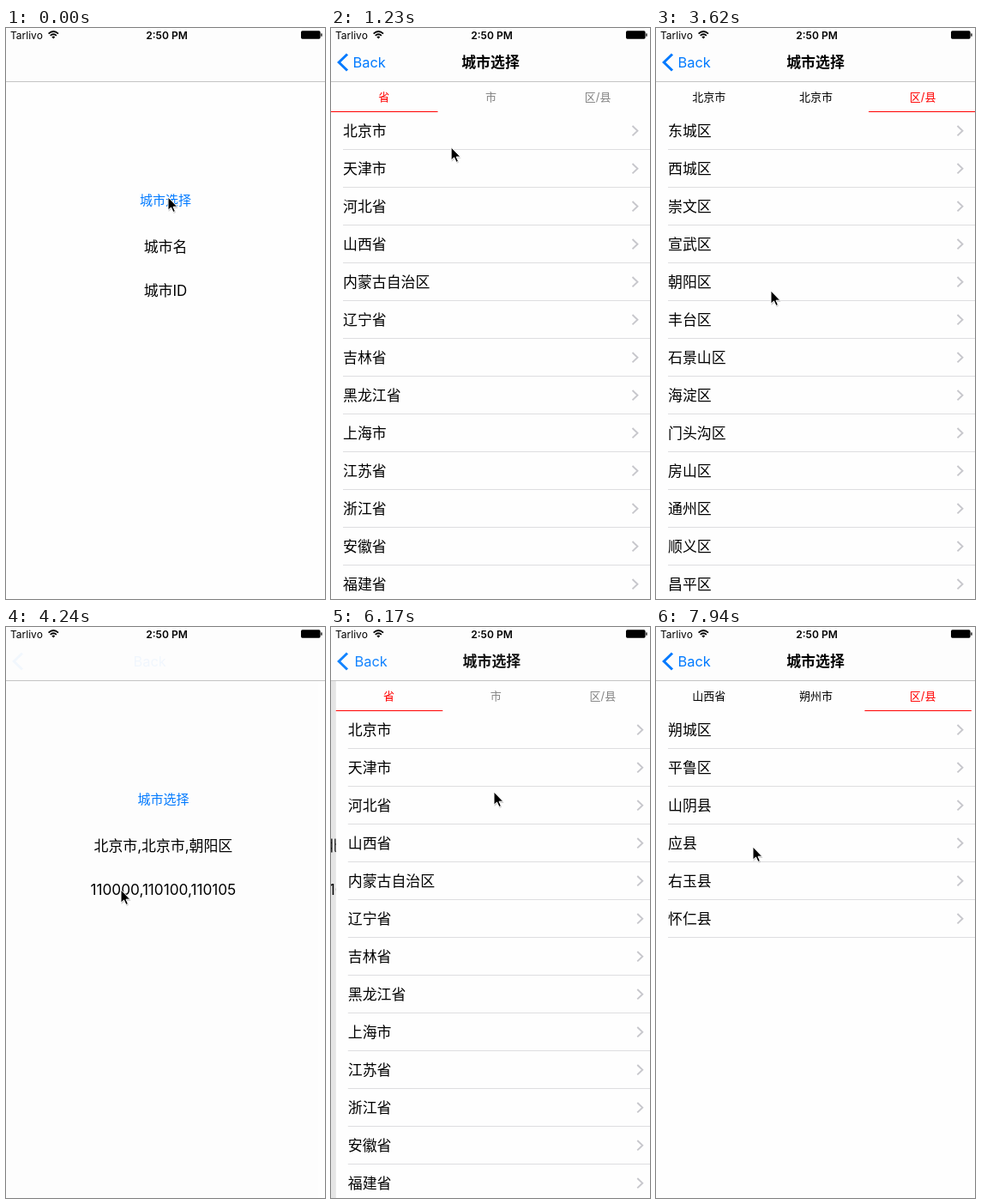
These frames come from a looping animation (372x665 px, 8000 ms). An HTML page:

```html
<!DOCTYPE html>
<html lang="zh-CN">
<head>
<meta charset="utf-8">
<title>城市选择</title>
<style>
html, body { margin: 0; width: 100%; height: 100%; overflow: hidden; background: #fefefe; }
svg { display: block; width: 372px; height: 665px; }
text { font-family: Inter, "Noto Sans CJK SC", "Noto Sans CJK", sans-serif; font-size: 16.9px; white-space: pre; }
.mid { text-anchor: middle; }
.tab { font-size: 13px; }
.status { font-size: 12px; }
.bold { font-weight: 600; }
.arrow { fill: none; stroke: #c7c7cc; stroke-width: 1.9; }
</style>
</head>
<body>
<svg viewBox="0 0 372 665">
  <rect width="372" height="665" fill="#fefefe"/>
  <g id="home">
    <rect y="63" width="372" height="602" fill="#fefefe"/>
    <text id="button" class="mid" x="186" y="205.6" fill="#007aff" style="font-size:15px">城市选择</text>
    <text id="names" class="mid" x="186" y="261"></text>
    <text id="codes" class="mid" x="186" y="311.6"></text>
  </g>
  <rect id="dim" y="63" width="372" height="602"/>
  <g id="picker">
    <rect y="63" width="372" height="602" fill="#fefefe"/>
    <g id="tabs"></g>
    <rect id="line" y="97" width="124.5" height="1" fill="#f00"/>
    <g id="rows"></g>
  </g>
  <rect width="372" height="62" fill="#fdfdfd"/>
  <rect y="62" width="372" height="1" fill="#c4c4c4"/>
  <text id="title" class="mid bold" x="186" y="46">城市选择</text>
  <path id="chevron" d="M19 30.5L9.2 40L19 49.5" fill="none" stroke="#007aff" stroke-width="3"/>
  <text id="back" y="46" fill="#007aff" style="font-size:16.4px">Back</text>

  <text class="status" x="5" y="12.5">Tarlivo</text>
  <g fill="none" stroke="#000" stroke-width="1.7">
    <path d="M49.6 6.6Q55.3 1.4 61 6.6"/>
    <path d="M51.7 8.9Q55.3 5.6 58.9 8.9"/>
  </g>
  <path d="M53.4 10.4Q55.3 8.8 57.2 10.4L55.3 12.5Z"/>
  <text class="status bold mid" x="187.5" y="12.5">2:50 PM</text>
  <rect x="344" y="3.3" width="22.6" height="9.4" rx="1.6"/>
  <rect x="367.3" y="6.2" width="1.3" height="3.6" rx=".6"/>

  <g id="cursor">
    <path d="M.6 1.6V17L4.2 13.7L6.6 19L9 18L6.7 13H11.6Z" opacity=".18"/>
    <path d="M0 0V15.2L3.5 12L6 17.5L8.4 16.4L6 11.2H10.8Z" stroke="#fff"/>
  </g>
</svg>
<script>
const LOOP = 8000, WIDTH = 372, ROW = 44, TICK = 88.25;
const POP = 3954, PUSH = 5820;
const $ = id => document.getElementById(id);

const words = s => s.split(' ');
const provinces = words('北京市 天津市 河北省 山西省 内蒙古自治区 辽宁省 吉林省 黑龙江省 上海市 江苏省 浙江省 安徽省 福建省');
const beijing = words('东城区 西城区 崇文区 宣武区 朝阳区 丰台区 石景山区 海淀区 门头沟区 房山区 通州区 顺义区 昌平区');
const shanxi = words('太原市 大同市 阳泉市 长治市 晋城市 朔州市 晋中市 运城市 忻州市 临汾市 吕梁市');
const shuozhou = words('朔城区 平鲁区 山阴县 应县 右玉县 怀仁县');
const blankTabs = ['省', '市', '区/县'];

// What the picker shows from each time on
const states = [
  { at: 0, chosen: [], list: provinces },
  { at: 1580, chosen: ['北京市'], list: ['北京市'] },
  { at: 3080, chosen: ['北京市', '北京市'], list: beijing },
  { at: PUSH, chosen: [], list: provinces },
  { at: 6970, chosen: ['山西省'], list: shanxi },
  { at: 7760, chosen: ['山西省', '朔州市'], list: shuozhou }
];

// Pointer strokes, each from wherever the last one ended
const strokes = [
  { from: 970, to: 1410, x: 131, y: 128 },
  { from: 2650, to: 2735, x: 131, y: 142 },
  { from: 2740, to: 2820, x: 131, y: 112 },
  { from: 3090, to: 3620, x: 134, y: 306 },
  { from: 4240, to: 4600, x: 107, y: 441 },
  { from: 4680, to: 5110, x: 184, y: 171 },
  { from: 5200, to: 5550, x: 190, y: 192 },
  { from: 6180, to: 6700, x: 149, y: 245 },
  { from: 6980, to: 7490, x: 113, y: 330 },
  { from: 7770, to: 7940, x: 113, y: 256 }
];

const clamp = v => Math.max(0, Math.min(1, v));
// The screen updates on a coarse, even beat
const onBeat = t => Math.floor((t + 15) / TICK) * TICK;
// Spring without overshoot
const settle = (t, start) => 1 - Math.exp(-Math.max(0, t - start) / 75);

function pointerAt(t) {
  let x = 189, y = 197;
  for (const s of strokes) {
    const f = 1 - (1 - clamp((t - s.from) / (s.to - s.from))) ** 2;
    x += (s.x - x) * f;
    y += (s.y - y) * f;
  }
  return [x, y];
}

function rowMarkup(name, i) {
  const y = 98 + ROW * i;
  return `<text x="14" y="${y + 28}">${name}</text>` +
    `<path class="arrow" d="M351.5 ${y + 16}l6 5.7l-6 5.7"/>` +
    `<rect x="14" y="${y + 43}" width="358" height="1" fill="#dedee0"/>`;
}

function tabMarkup(label, i, chosen) {
  const color = i < chosen.length ? '#000' : i === chosen.length ? '#f00' : '#838383';
  return `<text class="tab mid" x="${61.7 + 124.7 * i}" y="84.8" fill="${color}">${chosen[i] || label}</text>`;
}

let shown = null;
function showState(state) {
  if (state === shown) return;
  shown = state;
  $('rows').innerHTML = state.list.map(rowMarkup).join('');
  $('tabs').innerHTML = blankTabs.map((label, i) => tabMarkup(label, i, state.chosen)).join('');
}

const shift = (id, x, y = 0) => $(id).setAttribute('transform', `translate(${x} ${y})`);
const fade = (id, v) => $(id).setAttribute('opacity', clamp(v));

function draw(time) {
  const t = onBeat(time);
  const state = states.filter(s => t >= s.at).pop();
  showState(state);

  // 0 on the home page, 1 on the picker
  const done = t >= POP, popping = done && t < PUSH;
  const open = popping ? 1 - settle(t, POP) : settle(t, done ? PUSH + 45 : 395);
  shift('home', -112 * open);
  shift('picker', WIDTH * (1 - open));
  fade('dim', .1 * open);

  const level = state.chosen.length;
  $('line').setAttribute('x', level ? 124 * (level - 1 + settle(t, state.at - 64)) : 0);

  const navAlpha = popping ? open * 2 : open ** 5;
  shift('title', 90 * (1 - open));
  shift('back', 25.5 + 126 * (1 - open));
  fade('title', popping ? 2 * open - 1 : navAlpha);
  fade('back', navAlpha);
  fade('chevron', navAlpha);

  const pressed = [350, PUSH].some(a => t >= a && t < a + 80);
  fade('button', pressed ? .3 : 1);
  $('names').textContent = done ? '北京市,北京市,朝阳区' : '城市名';
  $('codes').textContent = done ? '110000,110100,110105' : '城市ID';
  $('codes').style.fontSize = done ? '17.2px' : '';

  shift('cursor', ...pointerAt(t));
}

function tick() {
  draw(performance.now() % LOOP);
  requestAnimationFrame(tick);
}
tick();
</script>
</body>
</html>
```
